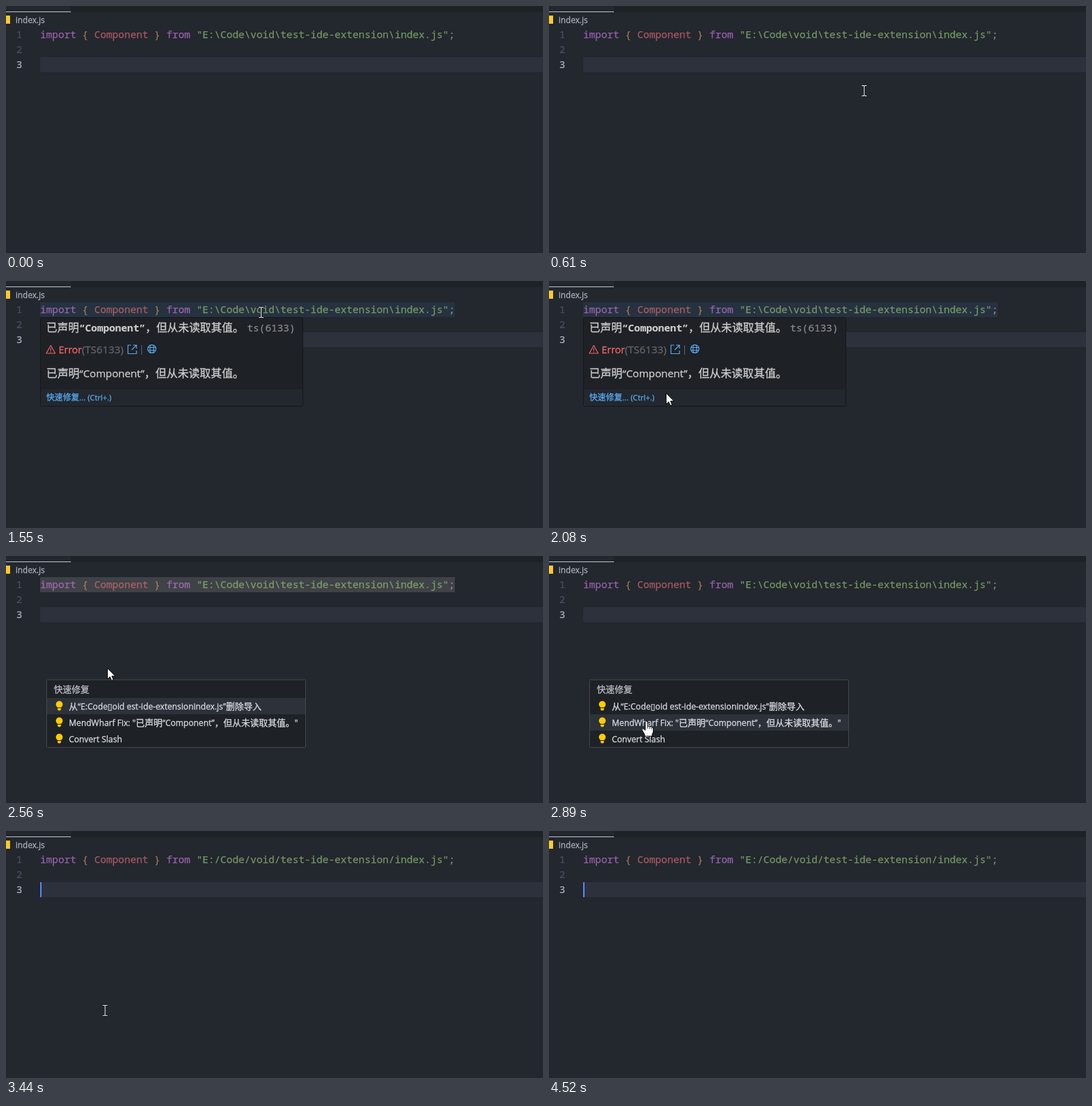
Write an HTML page that moves like this. It is 786 px wide and 362 px high and loops after 4.59 s.

```html
<!DOCTYPE html>
<html lang="zh-CN">
<head>
<meta charset="utf-8">
<title>Quick fix</title>
<style>
  html, body { margin: 0; width: 100%; height: 100%; overflow: hidden; background: #23272e; }
  svg { display: block; width: 786px; height: 362px; }
  text { white-space: pre; font-family: "Open Sans", "Noto Sans", "Noto Sans CJK SC", "DejaVu Sans", sans-serif; }
  .mono { font-family: "Noto Sans Mono", "DejaVu Sans Mono", "Noto Sans CJK SC", monospace; font-size: 14.66px; }
  .cjk { font-family: "Noto Sans CJK SC", "Noto Sans CJK JP", sans-serif; }
</style>
</head>
<body>
<svg id="stage" viewBox="0 0 786 362"></svg>
<script>
const LOOP = 4590;
const stage = document.getElementById('stage');

function add(parent, tag, attrs = {}, text) {
  const node = document.createElementNS('http://www.w3.org/2000/svg', tag);
  for (const key in attrs) node.setAttribute(key, attrs[key]);
  if (text !== undefined) node.textContent = text;
  parent.appendChild(node);
  return node;
}
const group = (parent = stage) => add(parent, 'g');
const rect = (parent, x, y, width, height, fill, more) =>
  add(parent, 'rect', { x, y, width, height, fill, ...more });
const path = (parent, d, more) => add(parent, 'path', { d, ...more });
const show = (node, on) => node.setAttribute('visibility', on ? 'visible' : 'hidden');

// A hairline stroke gives the letters a fuller weight.
const ink = (fill, width) => ({ fill, stroke: fill, 'stroke-width': width });

// Mixed Latin and Chinese text; Latin runs are set a little smaller.
function label(parent, x, y, size, fill, text) {
  const line = add(parent, 'text', { x, y, ...ink(fill, 0.3) });
  text.split(/([\u3000-\u9fff\uff00-\uffef]+)/).forEach((run, i) => {
    if (!run) return;
    const attrs = i % 2 ? { class: 'cjk', 'font-size': size } : { 'font-size': size * 0.94 };
    add(line, 'tspan', attrs, run);
  });
  return line;
}
const mono = (parent, x, y, fill, text, more) =>
  add(parent, 'text', { x, y, class: 'mono', ...ink(fill, 0.2), ...more }, text);

// Editor
rect(stage, 0, 0, 786, 362, '#23272e');
rect(stage, 95, 0, 691, 9, '#1e2227');
rect(stage, 0, 8, 95, 1, '#c3c6cb');
rect(stage, 0, 14, 6, 12, '#ffca28');
label(stage, 14, 24.5, 12.9, '#a9afb9', 'index.js');
rect(stage, 50, 75, 736, 22, '#2c313c');
['#495162', '#495162', '#abb2bf'].forEach((fill, i) => mono(stage, 15, 47 + 22 * i, fill, i + 1));

const mark = rect(stage, 50, 31, 607, 22, '#26323f');
const code = add(stage, 'text', { x: 50, y: 47, class: 'mono', opacity: 0.7 });
const token = (fill, text) => add(code, 'tspan', ink(fill, 0.25), text);
token('#c678dd', 'import ');
token('#d19a66', '{ ');
token('#e06c75', 'Component ');
token('#d19a66', '} ');
token('#c678dd', 'from ');
const file = token('#98c379', '');
token('#abb2bf', ';');
const caret = rect(stage, 50, 75, 2, 22, '#528bff');

// Hover card
const card = group();
rect(card, 50.5, 53.5, 384, 130, '#1e2125', { stroke: '#15171b', rx: 2 });
rect(card, 51, 159, 383, 24, '#23272e');
const PALE = '#cccccc', RED = '#f1666a', BLUE = '#55aaf0', DIM = '#62656a';
label(card, 59, 73.5, 16, PALE, '已声明');
mono(card, 107, 73.5, PALE, '“Component”', { 'font-weight': 600 });
label(card, 204, 73.5, 16, PALE, '，但从未读取其值。');
mono(card, 353, 73.5, '#8a8c8f', 'ts(6133)');
path(card, 'M65.5 94.5L72 106H59Z', { fill: 'none', stroke: RED, 'stroke-width': 1.2, 'stroke-linejoin': 'round' });
path(card, 'M65.5 98.5V102.3M65.5 103.3V104.5', { stroke: RED, 'stroke-width': 1.2 });
label(card, 77, 106, 15.4, RED, 'Error');
label(card, 111, 106, 16.3, DIM, '(TS6133)');
const line = { fill: 'none', stroke: BLUE, 'stroke-width': 1.2 };
path(card, 'M183 94H178.5V106.5H191V102M186 94H191V99M191 94L184 101', line);
rect(card, 198, 94, 1, 14, DIM);
add(card, 'circle', { cx: 213.5, cy: 99.5, r: 6, ...line });
add(card, 'ellipse', { cx: 213.5, cy: 99.5, rx: 2.7, ry: 6, ...line });
path(card, 'M208 97.5H219M208 101.5H219', line);
label(card, 59, 140.5, 16.2, PALE, '已声明“Component”，但从未读取其值。');
label(card, 59, 175, 12.1, BLUE, '快速修复... (Ctrl+.)');

// Quick fix menu
const menu = group();
rect(menu, 59.5, 181.5, 379, 99, '#1e2125', { stroke: '#45474b', rx: 1 });
const hover = rect(menu, 60, 208, 378, 24, '#2c313a');
label(menu, 70, 199.5, 13, '#b8bbc0', '快速修复');
[
  '从“E:Code▯oid est-ide-extensionindex.js”删除导入',
  'MendWharf Fix: "已声明“Component”，但从未读取其值。"',
  'Convert Slash'
].forEach((text, i) => {
  const y = 220 + 24 * i;
  path(menu, `M75.5 ${y + 2}Q73 ${y} 73 ${y - 2.5}a5 5 0 0 1 10 0Q83 ${y} 80.5 ${y + 2}Z`, { fill: '#ffcc00' });
  path(menu, `M75.5 ${y + 3}H80.5V${y + 5}Q80 ${y + 6.5} 78 ${y + 6.5}T75.5 ${y + 5}Z`, { fill: '#ffcc00' });
  label(menu, 92, y + 4.5, 13, '#d7dae0', text);
});

// Mouse pointers, drawn around their hot spot
const pointer = group();
const shapes = { beam: group(pointer), arrow: group(pointer), hand: group(pointer) };
const beam = 'M-3.5 -7.5H-1L0 -6.5L1 -7.5H3.5M0 -6.5V6.5M-3.5 7.5H-1L0 6.5L1 7.5H3.5';
path(shapes.beam, beam, { fill: 'none', stroke: '#15171a', 'stroke-width': 2.4 });
path(shapes.beam, beam, { fill: 'none', stroke: '#e4e4e4', 'stroke-width': 1.1 });
const solid = { fill: '#fff', stroke: '#000', 'stroke-width': 0.9, 'stroke-linejoin': 'round' };
path(shapes.arrow, 'M.5 .5V16.5L4.2 13L6.7 18.5L9.2 17.4L6.8 12H11.8Z', solid);
path(shapes.hand, 'M-2 1.5Q-2 0 -.5 0T1.2 1.5V7.5l1.5 .3q1 -.8 2.5 .5q1.2 -.6 2.4 .8q2 -.3 2 2V15q0 2 -1.6 4V22H-3V19.5L-6.5 13.5q-1 -2 .5 -2.6q1.2 -.3 2 .8L-2 13.5Z', solid);
path(shapes.hand, 'M1.2 7.5V11M4.2 8.3V11.5M7 9.5V12', { stroke: '#000', 'stroke-width': 0.8 });

// Each move runs in equal steps along evenly spaced points.
const easeOut = u => u * (1.4 - 0.4 * u);
const easeIn = u => u * (0.5 + 0.5 * u);
const linear = u => u;
const SLACK = 14; // step times are rounded to the frame clock
const moves = [
  { from: 260, to: 740, steps: 8, ease: easeOut, points: [[685, 343], [404, 68]] },
  { from: 810, to: 1150, steps: 6, ease: easeOut, points: [[396, 62], [373.5, 46]] },
  { from: 1820, to: 2280, steps: 8, ease: linear,
    points: [[366, 52], [318, 78], [256, 115], [203, 148], [171, 164], [163, 164], [157, 164], [154, 164]] },
  { from: 2350, to: 2560, steps: 2, ease: linear, points: [[148, 164], [148, 164]] },
  { from: 2760, to: 3110, steps: 6, ease: linear,
    points: [[148, 176], [146, 212], [143, 242], [143, 256], [144, 262], [145, 263]] },
  { from: 3770, to: 4180, steps: 7, ease: easeIn, points: [[156, 265], [649, 356]] }
];

function pointerAt(t) {
  const move = moves.filter(m => t >= m.from).pop();
  if (!move || t >= 4250) return null;
  const last = move.steps - 1;
  const step = Math.min(last, Math.floor((t - move.from + SLACK) / (move.to - move.from) * last));
  const at = move.ease(step / last) * (move.points.length - 1);
  const i = Math.min(move.points.length - 2, Math.floor(at));
  const [a, b] = [move.points[i], move.points[i + 1]];
  return [0, 1].map(n => a[n] + (b[n] - a[n]) * (at - i));
}

function pointerShape(t, y) {
  if (t < 1820 || t >= 3380) return 'beam';
  if (t < 2350) return y < 54 ? 'beam' : 'arrow';
  if (t < 2490) return 'hand';
  return y < 208 ? 'arrow' : 'hand';
}

function draw(t) {
  const spot = pointerAt(t);
  const y = spot ? spot[1] : 0;
  const shape = spot && pointerShape(t, y);
  for (const name in shapes) show(shapes[name], name === shape);
  if (spot) pointer.setAttribute('transform', `translate(${spot})`);

  show(mark, t >= 1480 && t < 2760);
  mark.setAttribute('fill', t < 2490 ? '#26323f' : '#3f4247');
  show(card, t >= 1480 && t < 2490);
  card.setAttribute('opacity', t < 1550 ? 0.5 : 1);
  show(menu, t >= 2490 && t < 3380);
  const row = Math.max(0, Math.min(2, Math.floor((y - 208) / 24)));
  hover.setAttribute('y', 208 + 24 * row);

  const slash = t < 3440 ? '\\' : '/';
  file.textContent = '"' + ['E:', 'Code', 'void', 'test-ide-extension', 'index.js'].join(slash) + '"';
  show(caret, (t >= 3440 && t < 3980) || t >= 4520);
}

const start = performance.now();
function tick() {
  draw((performance.now() - start) % LOOP);
  requestAnimationFrame(tick);
}
tick();
</script>
</body>
</html>
```
